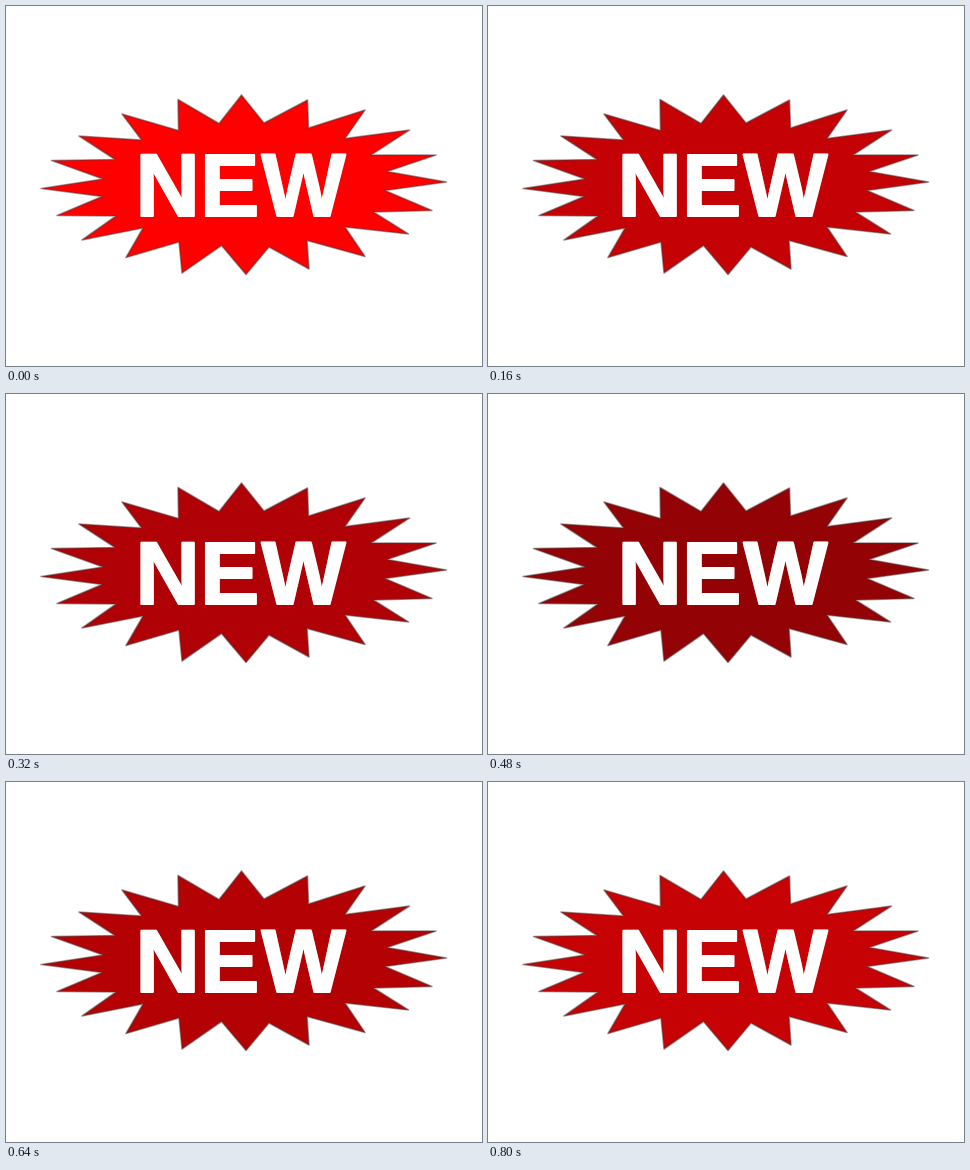
An HTML page for the animation above (0.96 s loop, 476 by 360 pixels).

```html
<!DOCTYPE html>
<html lang="en">
<head>
<meta charset="utf-8">
<title>New badge</title>
<style>
  html, body { margin: 0; width: 100%; height: 100%; overflow: hidden; background: #fff; }
  svg { display: block; width: 476px; height: 360px; }
  #burst { fill: #fe0000; stroke: #4a3030; stroke-opacity: .5; stroke-width: 1.6; stroke-linejoin: round; }
  text {
    font: bold 89px "Liberation Sans", Arial, sans-serif;
    fill: #fff; stroke: #fff; stroke-width: 2; stroke-linejoin: round;
    filter: drop-shadow(0 0 .6px rgba(200, 170, 170, .6));
  }
</style>
</head>
<body>
<svg viewBox="0 0 476 360">
  <!-- Spikes clockwise from the top: tip, then valley -->
  <polygon id="burst" points="
    235.5,89 258,117 301.5,94 302.5,122 359,104 339,132.5 403.5,124 365,149
    430,149 381,165.5 440.5,176 379,184.5 426,204.5 367.5,206 402.5,228 339,221
    359,250.5 301,234.5 303,263 263,241 240,268.5 215.5,239.5 176,267 173,236
    120,251.5 137,222 76,234 110,210 51,209.5 96,190.5 35,182.5 97,173
    45.5,154.5 109,153.5 73,130 135.5,134 116,108 172.5,124.5 172,93.5 213,117.5"/>
  <text x="129.4 194 255.5" y="210.1">NEW</text>
</svg>
<script>
  const STEP = 160;
  const reds = ["#fe0000", "#c40206", "#b00206", "#930204", "#b40204", "#c60204"];

  const frames = [...reds, reds[0]].map((fill, i) => ({
    fill, offset: i / reds.length, easing: "step-end"
  }));
  document.getElementById("burst").animate(frames, {
    duration: STEP * reds.length, iterations: Infinity
  });
</script>
</body>
</html>
```
